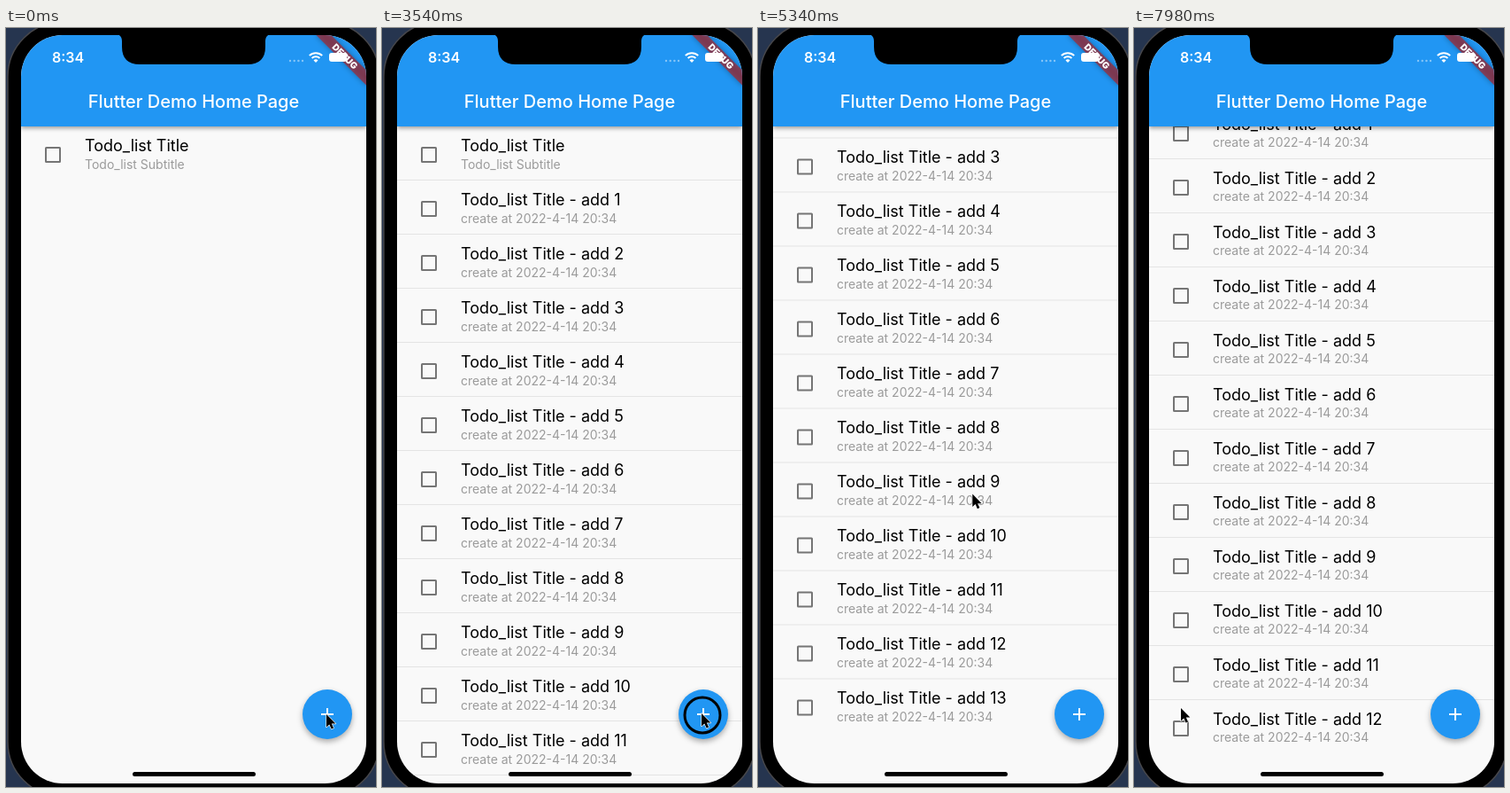
Write an HTML page that moves like this. It is 418 px wide and 856 px high and loops after 8000 ms.

```html
<!DOCTYPE html>
<html lang="en">
<head>
<meta charset="utf-8">
<title>Todo list</title>
<style>
  html, body { margin: 0; width: 100%; height: 100%; overflow: hidden; background: #26354f; }
  svg { display: block; width: 418px; height: 856px; font-family: Inter, Roboto, sans-serif; }
  .title { font-size: 18px; }
  .subtitle { font-size: 14px; fill: #9b9b9b; }
  .bar { filter: drop-shadow(0 2px 2.5px rgba(0, 0, 0, .38)); }
  .fab { filter: drop-shadow(0 3px 3px rgba(0, 0, 0, .32)); }
  .ribbon { filter: drop-shadow(0 0 3px rgba(0, 0, 0, .5)); }
</style>
</head>
<body>
<svg viewBox="0 0 418 856">
  <defs>
    <clipPath id="screen"><rect x="17" y="8" width="390" height="844" rx="47"/></clipPath>
    <clipPath id="viewport"><rect x="17" y="111" width="390" height="745"/></clipPath>
    <clipPath id="row"><rect x="17" y="1" width="390" height="60"/></clipPath>
    <clipPath id="button"><circle cx="363" cy="774" r="28"/></clipPath>
  </defs>

  <rect width="418" height="856" fill="#26354f"/>
  <rect x="2" y="-7" width="420" height="874" rx="62" stroke="#46464a" stroke-width="1.5"/>

  <g clip-path="url(#screen)">
    <rect x="17" y="8" width="390" height="844" fill="#f9f9f9"/>
    <g clip-path="url(#viewport)"><g id="list"></g></g>

    <rect class="bar" x="17" y="0" width="390" height="111" fill="#2196f3"/>
    <text x="212" y="90" font-size="20" font-weight="500" fill="#fff" text-anchor="middle">Flutter Demo Home Page</text>

    <circle class="fab" cx="363" cy="774" r="28" fill="#2196f3"/>
    <g clip-path="url(#button)"><circle id="fabSplash" cx="363" cy="774" fill="#fff"/></g>
    <path d="M356 774h14M363 767v14" stroke="#fff" stroke-width="2"/>

    <g transform="translate(407 8) rotate(45)">
      <rect class="ribbon" x="-40" y="28" width="80" height="12" fill="#b71c1c" fill-opacity=".63"/>
      <text y="37.7" font-size="10.2" font-weight="900" fill="#fff" text-anchor="middle">DEBUG</text>
    </g>

    <path d="M125 7Q131 8 131 15V21Q131 41 151 41H273Q293 41 293 21V15Q293 8 299 7Z"/>
    <text x="52" y="38.5" font-size="16" font-weight="600" fill="#fff">8:34</text>
    <g fill="#fff">
      <g opacity=".45">
        <circle cx="321" cy="37" r="1.2"/><circle cx="325.7" cy="37" r="1.2"/>
        <circle cx="330.4" cy="37" r="1.2"/><circle cx="335" cy="37" r="1.2"/>
      </g>
      <path d="M350 39l-2.5-2.6a3.6 3.6 0 0 1 5 0Z"/>
      <path d="M345.6 34.1a6.4 6.4 0 0 1 8.8 0M342.8 31.1a10.4 10.4 0 0 1 14.4 0" fill="none" stroke="#fff" stroke-width="2"/>
      <rect x="365" y="28" width="20" height="10" rx="3"/>
      <path d="M386 31q2 2 0 4Z"/>
    </g>
    <rect x="143" y="839" width="139" height="5" rx="2.5"/>
  </g>

  <g id="cursor">
    <circle id="ring" cx="1" cy="2" r="20" fill="none" stroke="#000" stroke-width="3"/>
    <path d="M0 0V14.5L3.3 11.5L5.6 16.6L8.1 15.5L5.8 10.6H10.4Z" stroke="#fff" stroke-width="1.2" stroke-linejoin="round" paint-order="stroke"/>
  </g>
</svg>

<script>
const LOOP = 8000, STEP = 60;
const ROW = 61, ADDED = 13, CLICK_EVERY = 280;
const DRAG_START = 4150, RELEASE = 5330;
const CHECK = 6420, REMOVE = 6900;
const FULL_EXTENT = 146;

const el = id => document.getElementById(id);
const show = (node, visible) => node.setAttribute("visibility", visible ? "inherit" : "hidden");
const within = (t, from, to) => t >= from && t < to;

// Keys are [time, ...values]; values between keys are linear.
function track(keys, t) {
  const i = keys.findIndex(key => key[0] > t);
  if (i === 0) return keys[0].slice(1);
  if (i < 0) return keys.at(-1).slice(1);
  const [a, b] = [keys[i - 1], keys[i]];
  const p = (t - a[0]) / (b[0] - a[0]);
  return a.slice(1).map((v, j) => v + (b[j + 1] - v) * p);
}

const cursorPath = [
  [0, 362, 774], [2640, 361, 773], [3720, 361, 773], [3900, 305, 748], [4080, 257, 725],
  [DRAG_START, 256, 725], [4320, 255, 690], [4740, 254, 596], [5200, 243, 527], [5400, 242, 525],
  [5520, 205, 580], [5700, 110, 725], [5820, 77, 765], [6060, 54, 768], [7980, 53, 767]
];
const dragPath = [[4240, 0], [4320, 15], [4740, 112], [4920, 146], [5200, 170], [RELEASE, 172]];

function scrollAt(t) {
  const settle = start => Math.exp(-(t - start) / 100);
  if (t < RELEASE) return track(dragPath, t)[0];
  if (t < REMOVE) return FULL_EXTENT + 26 * settle(RELEASE);
  return FULL_EXTENT - ROW + ROW * settle(REMOVE);
}

function rowMarkup(i) {
  const title = "Todo_list Title" + (i ? ` - add ${i}` : "");
  const subtitle = i ? "create at 2022-4-14 20:34" : "Todo_list Subtitle";
  return `<g transform="translate(0 ${111 + i * ROW})">
    ${i ? '<path d="M17 -.5H407" stroke="#e4e4e4"/>' : ""}
    ${i === 10 ? '<g clip-path="url(#row)"><circle id="rowSplash" cx="258" cy="21"/></g>' : ""}
    <rect x="45" y="24" width="16" height="16" rx=".5" fill="none" stroke="#757575" stroke-width="2"/>
    ${i === ADDED ? `<g id="checked"><rect x="44" y="23" width="18" height="18" rx="1" fill="#2196f3"/>
      <path d="M47 32l4 4 8-8" fill="none" stroke="#fff" stroke-width="2"/></g>` : ""}
    <text class="title" x="89" y="28">${title}</text>
    <text class="subtitle" x="89" y="47.5">${subtitle}</text>
  </g>`;
}

const list = el("list");
list.innerHTML = Array.from({ length: ADDED + 1 }, (_, i) => rowMarkup(i)).join("");
const rows = [...list.children];

function splash(node, age, duration, size, alpha) {
  const p = age / duration;
  show(node, p >= 0 && p < 1);
  node.setAttribute("r", Math.max(0, size * Math.min(1, p)));
  node.setAttribute("opacity", alpha * Math.min(1, 2 * (1 - p)));
}

function render(t) {
  const added = Math.min(ADDED, Math.floor(t / CLICK_EVERY));
  const last = t < REMOVE ? added : ADDED - 1;
  rows.forEach((row, i) => show(row, i <= last));
  list.setAttribute("transform", `translate(0 ${-scrollAt(t)})`);
  show(el("checked"), within(t, CHECK, REMOVE));

  // Each press begins 110 ms before its new row appears.
  const pressAge = (t + 110) % CLICK_EVERY;
  const clicking = within(t + 110, CLICK_EVERY, (ADDED + 1) * CLICK_EVERY);
  splash(el("fabSplash"), clicking ? pressAge : -1, 200, 28, .2);
  splash(el("rowSplash"), t - DRAG_START, 340, 38, .07);

  const [x, y] = track(cursorPath, t);
  el("cursor").setAttribute("transform", `translate(${x} ${y})`);
  show(el("ring"), (clicking && pressAge < 100) || within(t, DRAG_START, RELEASE) || within(t, CHECK - 110, CHECK));
}

function frame(now) {
  const t = now % LOOP;
  render(Math.floor(t / STEP) * STEP);
  requestAnimationFrame(frame);
}
requestAnimationFrame(frame);
</script>
</body>
</html>
```
